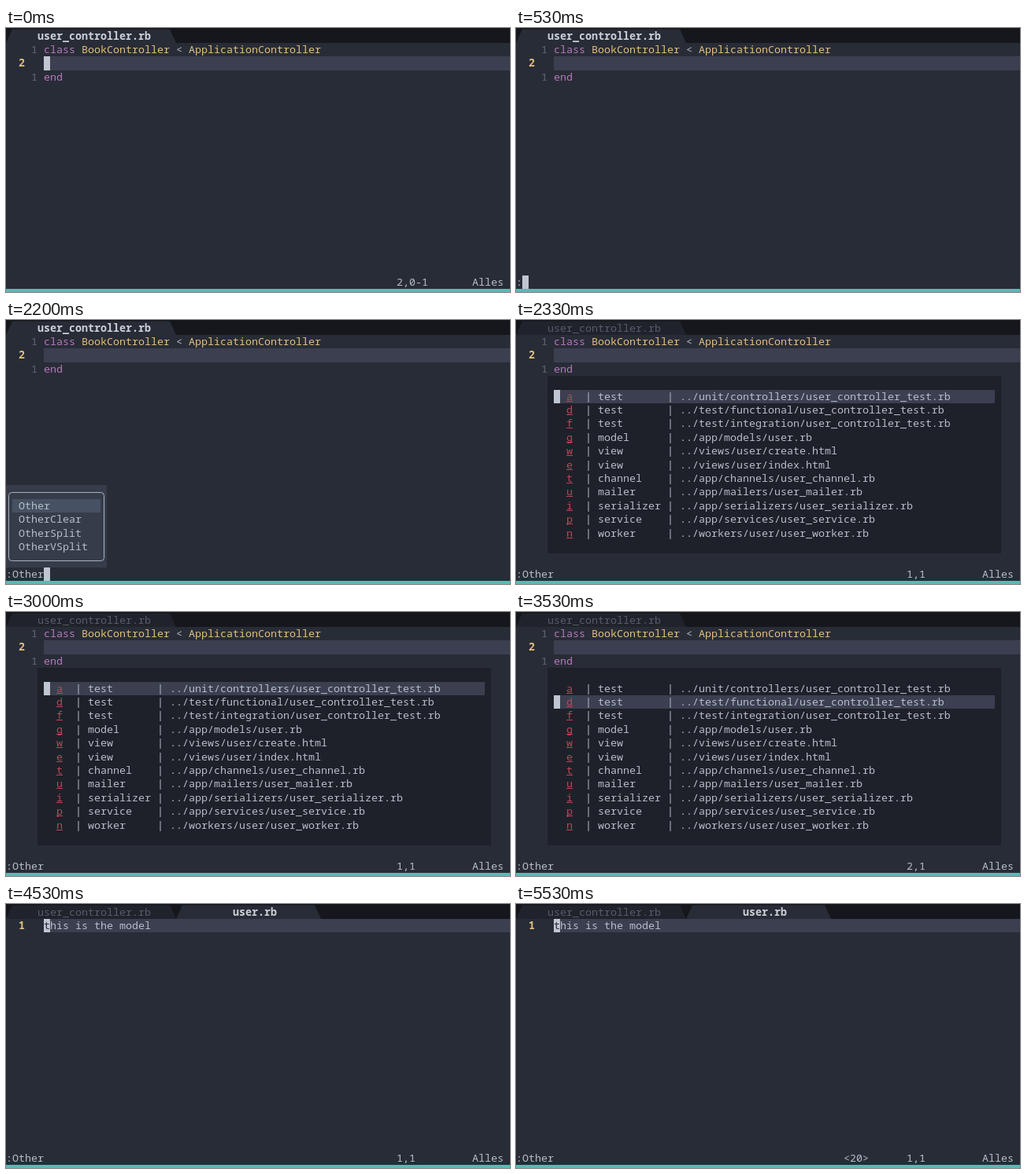
These frames come from a looping animation (640 by 336 pixels, 5.59 s). An HTML page with a canvas:

```html
<!DOCTYPE html>
<html lang="en">
<head>
<meta charset="utf-8">
<style>
html, body { margin: 0; width: 100%; height: 100%; overflow: hidden; background: #282c36; }
canvas { display: block; width: 640px; height: 336px; }
</style>
</head>
<body>
<canvas id="screen"></canvas>
<script>
const LOOP = 5590, COL = 8, ROW = 17.4, TOP = 1.5;
const C = {
  bg: '#282c36', bar: '#15171d', dimTab: '#20232b', line: '#3b3f50', float: '#1e2129',
  text: '#b7bdc9', dim: '#575d6b', gutter: '#5f6676', yellow: '#e2c07d', purple: '#b678bd',
  red: '#c2445a', cursor: '#c0c5d2', menu: '#363c4a', pick: '#465263', teal: '#50bdb4'
};
const FILES = [
  ['a', 'test', '../unit/controllers/user_controller_test.rb'],
  ['d', 'test', '../test/functional/user_controller_test.rb'],
  ['f', 'test', '../test/integration/user_controller_test.rb'],
  ['g', 'model', '../app/models/user.rb'],
  ['w', 'view', '../views/user/create.html'],
  ['e', 'view', '../views/user/index.html'],
  ['t', 'channel', '../app/channels/user_channel.rb'],
  ['u', 'mailer', '../app/mailers/user_mailer.rb'],
  ['i', 'serializer', '../app/serializers/user_serializer.rb'],
  ['p', 'service', '../app/services/user_service.rb'],
  ['n', 'worker', '../workers/user/user_worker.rb']
];
const COMMANDS = ['Other', 'OtherClear', 'OtherSplit', 'OtherVSplit'];

// Key presses: time and the command line that results
const TYPED = [[70, ':'], [800, ':o'], [930, ':ot'], [1070, ':oth'], [1130, ':othe'], [1200, ':other'], [1470, ':Other']];
const MOVES = [3530, 3670, 3800];
const MENU_AT = 930, PICK_AT = 1470, FLOAT_AT = 2330, MODEL_AT = 4070, LEADER_AT = 5530;

const canvas = document.getElementById('screen');
const ctx = canvas.getContext('2d');
const ratio = window.devicePixelRatio || 1;
canvas.width = 640 * ratio;
canvas.height = 336 * ratio;
ctx.scale(ratio, ratio);

const y = row => TOP + row * ROW;

function rect(x, top, w, h, color) {
  ctx.fillStyle = color;
  ctx.fillRect(x, top, w, h);
}

function cells(col, row, w, h, color) {
  const top = Math.round(y(row));
  rect(col * COL, top, w * COL, Math.round(y(row + h)) - top, color);
}

function text(str, col, row, color = C.text, bold = false) {
  ctx.font = `${bold ? 'bold ' : ''}13.333px "Noto Sans Mono", "DejaVu Sans Mono", monospace`;
  ctx.fillStyle = color;
  ctx.fillText(str, col * COL, Math.round(y(row) + 13));
}

function tab(name, col, width, nameCol, active) {
  const x = col * COL, end = x + width * COL;
  ctx.fillStyle = active ? C.bg : C.dimTab;
  ctx.beginPath();
  ctx.moveTo(x, 19);
  ctx.lineTo(x + COL, TOP);
  ctx.lineTo(end - COL, TOP);
  ctx.lineTo(end, 19);
  ctx.fill();
  text(name, nameCol, 0, active ? '#cdd1da' : C.dim, active);
}

function controller() {
  text('1', 4, 1, C.gutter);
  text('class', 6, 1, C.purple);
  text('BookController', 12, 1, C.yellow);
  text('<', 27, 1);
  text('ApplicationController', 29, 1, C.yellow);
  cells(6, 2, 74, 1, C.line);
  text('2', 2, 2, C.yellow, true);
  text('1', 4, 3, C.gutter);
  text('end', 6, 3, C.purple);
}

function menu(picked) {
  cells(0, 12, 16, 6, C.menu);
  ctx.strokeStyle = '#a9b1bf';
  ctx.lineWidth = 1;
  ctx.beginPath();
  ctx.roundRect(3.5, 219.5, 121, 87, 4);
  ctx.stroke();
  if (picked) cells(1, 13, 14, 1, C.pick);
  COMMANDS.forEach((name, i) => text(name, 2, 13 + i));
}

function picker(current) {
  cells(5, 4, 72, 13, C.float);
  cells(6, 5 + current, 70, 1, C.line);
  cells(6, 5 + current, 1, 1, C.cursor);
  FILES.forEach(([key, kind, path], i) => {
    const row = 5 + i;
    text(key, 8, row, C.red);
    rect(64, Math.round(y(row) + 14), 8, 1, C.red);
    text('|', 11, row);
    text(kind, 13, row);
    text('|', 24, row);
    text(path, 26, row);
  });
}

function ruler(position) {
  text(position, 62, 18);
  text('Alles', 74, 18);
}

function draw(t) {
  const floating = t >= FLOAT_AT && t < MODEL_AT;
  const model = t >= MODEL_AT;
  rect(0, 0, 640, 336, C.bg);
  rect(0, 0, 640, 19, C.bar);
  tab('user_controller.rb', 0, 27, 5, t < FLOAT_AT);

  if (model) {
    tab('user.rb', 27, 23, 36, true);
    cells(6, 1, 74, 1, C.line);
    cells(6, 1, 1, 1, C.cursor);
    text('1', 2, 1, C.yellow, true);
    text('t', 6, 1, C.bg);
    text('his is the model', 7, 1);
    ruler('1,1');
    if (t >= LEADER_AT) text('<20>', 52, 18);
  } else {
    controller();
  }

  const typed = TYPED.filter(([at]) => t >= at).pop();
  if (typed) text(typed[1], 0, 18);

  if (floating) {
    const current = MOVES.filter(at => t >= at).length;
    picker(current);
    ruler(`${current + 1},1`);
  } else if (!model && typed) {
    cells(typed[1].length, 18, 1, 1, C.cursor);
    if (t >= MENU_AT) menu(t >= PICK_AT);
  } else if (!model) {
    cells(6, 2, 1, 1, C.cursor);
    ruler('2,0-1');
  }

  rect(0, 332, 640, 4, C.teal);
}

function frame(now) {
  draw(now % LOOP);
  requestAnimationFrame(frame);
}
requestAnimationFrame(frame);
</script>
</body>
</html>
```
